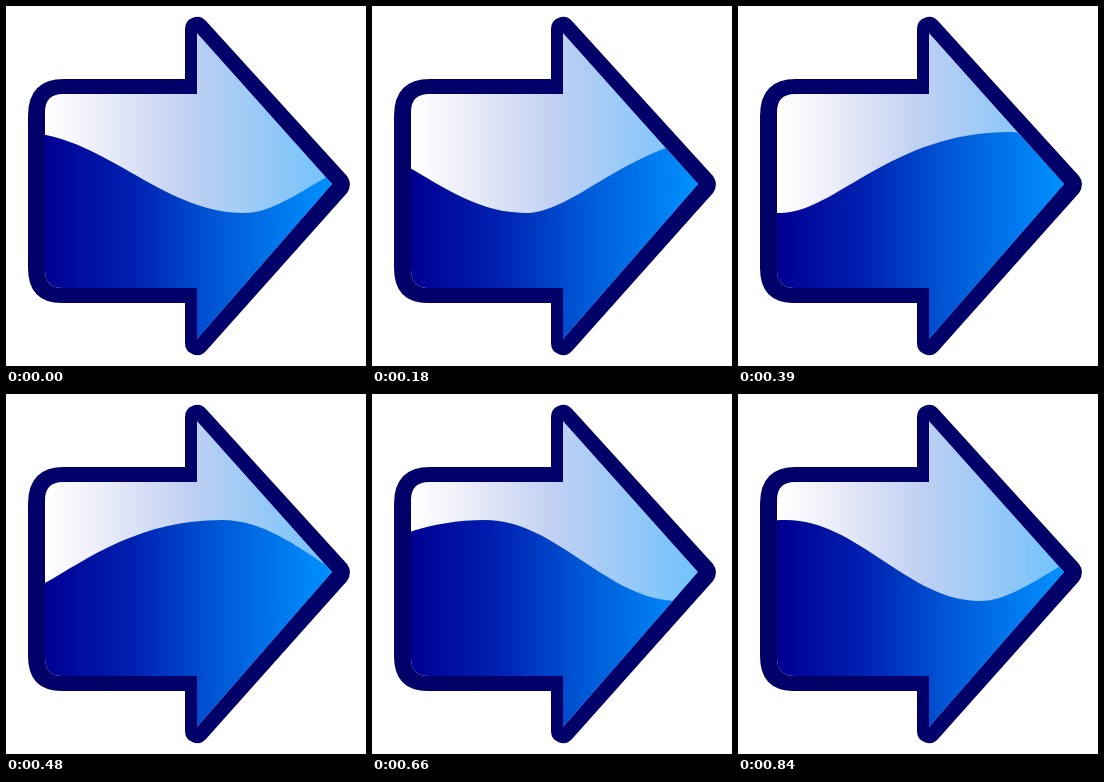
An HTML page that plays this animation: 360x360 px, repeating every 870 ms.

```html
<!DOCTYPE html>
<html lang="en">
<head>
<meta charset="utf-8">
<title>Wave arrow</title>
<style>
  html, body { margin: 0; width: 100%; height: 100%; overflow: hidden; background: #fff; }
  svg { display: block; width: 100vw; height: 100vh; }
</style>
</head>
<body>
<svg viewBox="0 0 360 360">
  <defs>
    <linearGradient id="sky" gradientUnits="userSpaceOnUse" x1="39" y1="0" x2="327" y2="0">
      <stop offset="0" stop-color="#fff"/>
      <stop offset=".16" stop-color="#f0f0fa"/>
      <stop offset=".5" stop-color="#c0d0f2"/>
      <stop offset="1" stop-color="#70c2fc"/>
    </linearGradient>
    <linearGradient id="sea" gradientUnits="userSpaceOnUse" x1="39" y1="0" x2="327" y2="0">
      <stop offset="0" stop-color="#000092"/>
      <stop offset=".3" stop-color="#0020b0"/>
      <stop offset=".6" stop-color="#0058d6"/>
      <stop offset="1" stop-color="#0092ff"/>
    </linearGradient>
    <path id="inner" d="M39 106Q39 88 57 88H191V27L326 178L191 333V282H57Q39 282 39 264Z"/>
    <clipPath id="clip"><use href="#inner"/></clipPath>
  </defs>
  <path fill="#000068" d="M22 110Q22 73 58 73H179V23A12 12 0 0 1 200 15L341 170Q347 178 341 187L200 345A12 12 0 0 1 179 337V297H56Q22 297 22 262Z"/>
  <use href="#inner" fill="url(#sky)"/>
  <path id="wave" fill="url(#sea)" clip-path="url(#clip)"/>
</svg>
<script>
const LOOP = 870, STEP = 30, CREST = 126, TROUGH = 207;
const wave = document.getElementById('wave');

// time, then x of: crest, trough, crest, trough
const keys = [
  [0, 12, 238, 466, 661],
  [180, -62, 153, 381, 581],
  [270, -85, 112, 340, 540],
  [390, -150, 42, 272, 467],
  [570, -260, -68, 160, 353],
  [720, -340, -145, 82, 276],
  [840, -375, -180, 48, 242],
  [870, -411, -216, 12, 238]
];

function extremes(t) {
  const i = keys.findIndex(k => k[0] > t);
  const a = keys[i - 1], b = keys[i];
  const f = (t - a[0]) / (b[0] - a[0]);
  return a.slice(1).map((x, n) => x + (b[n + 1] - x) * f);
}

function curve(x0, y0, x1, y1, h0, h1) {
  const w = x1 - x0;
  return `C${x0 + w * h0} ${y0} ${x1 - w * h1} ${y1} ${x1} ${y1}`;
}

function draw(now) {
  const t = Math.floor((now % LOOP) / STEP) * STEP;
  const [a, b, c, d] = extremes(t);
  wave.setAttribute('d', `M${a} ${CREST}` +
    curve(a, CREST, b, TROUGH, .37, .37) +
    curve(b, TROUGH, c, CREST, .24, .52) +
    curve(c, CREST, d, TROUGH, .37, .37) +
    curve(d, TROUGH, d + 228, CREST, .24, .52) +
    `V360H${a}Z`);
}

const start = performance.now();
function tick() {
  draw(performance.now() - start);
  requestAnimationFrame(tick);
}
tick();
</script>
</body>
</html>
```
